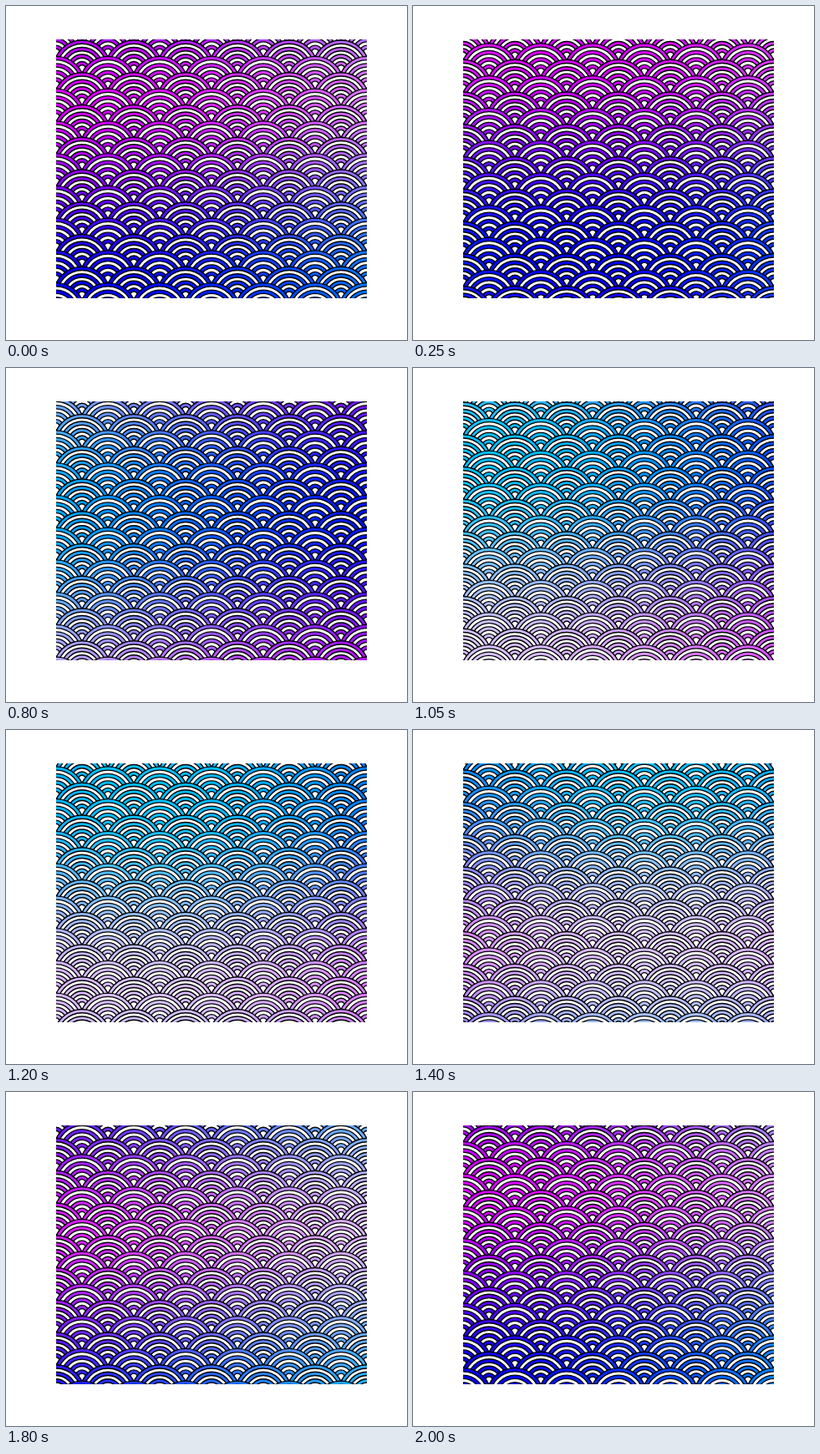
Animation, 480 px wide and 400 px high, one loop 2050 ms. Source, as an HTML page with a canvas:

```html
<!DOCTYPE html>
<html lang="en">
<head>
<meta charset="utf-8">
<title>Waves</title>
<style>
  html, body { margin: 0; width: 100%; height: 100%; overflow: hidden; background: #fff; }
  canvas { display: block; }
</style>
</head>
<body>
<canvas id="stage" width="480" height="400"></canvas>
<script>
const X = 60, Y = 40, W = 372, H = 310;
const STEP = 31, ROW = H / 16, RADIUS = 34, BANDS = 8;
const FRAMES = 40, FRAME_MS = 50, LOOP = 2050;
const TAU = 2 * Math.PI;

const ctx = document.getElementById('stage').getContext('2d');
const layer = document.createElement('canvas');
layer.width = W;
layer.height = H;
const scales = layer.getContext('2d');

function disc(x, y, r) {
  scales.beginPath();
  scales.arc(x, y, r, 0, TAU);
}

// Coloured bands are cut out so that the field below shows through.
function scale(x, y) {
  for (let i = 0; i < BANDS; i++) {
    disc(x, y, RADIUS * (1 - i / BANDS));
    scales.globalCompositeOperation = i % 2 ? 'source-over' : 'destination-out';
    scales.fill();
    scales.globalCompositeOperation = 'source-over';
    scales.stroke();
  }
}

function drawScales(phase) {
  scales.clearRect(0, 0, W, H);
  scales.fillStyle = '#fff';
  scales.strokeStyle = '#000';
  scales.lineWidth = 1.4;
  for (let j = -5; j < 18; j++) {
    const y = 35 + (j + 2 * phase) * ROW;
    for (let x = j % 2 ? 0 : -STEP; x <= W + STEP; x += 2 * STEP) scale(x, y);
  }
}

function wave(x1, y1, colour) {
  const g = ctx.createLinearGradient(X, Y, X + x1, Y + y1);
  for (let i = 0; i <= 20; i++) g.addColorStop(i / 20, colour(i / 20));
  ctx.fillStyle = g;
  ctx.fillRect(X, Y, W, H);
}

function drawField(phase) {
  ctx.globalCompositeOperation = 'source-over';
  wave(0, H, v => {
    const red = 0.5 + 0.5 * Math.cos(TAU * ((v * H - 68) / 480 + phase));
    return `rgb(${217 * red}, 0, 255)`;
  });
  ctx.globalCompositeOperation = 'lighter';
  wave(W, 0, u => {
    const green = 0.5 - 0.5 * Math.cos(TAU * (0.295 * u - phase - 0.012));
    return `rgb(0, ${192 * green}, 0)`;
  });
  ctx.globalCompositeOperation = 'source-over';
}

function draw(now) {
  const phase = Math.max(0, Math.floor(now % LOOP / FRAME_MS) - 1) / FRAMES;
  ctx.fillStyle = '#fff';
  ctx.fillRect(0, 0, 480, 400);
  drawField(phase);
  drawScales(phase);
  ctx.drawImage(layer, X, Y);
}

let start;
function tick() {
  const now = performance.now();
  start ??= now;
  draw(now - start);
  requestAnimationFrame(tick);
}
tick();
</script>
</body>
</html>
```
